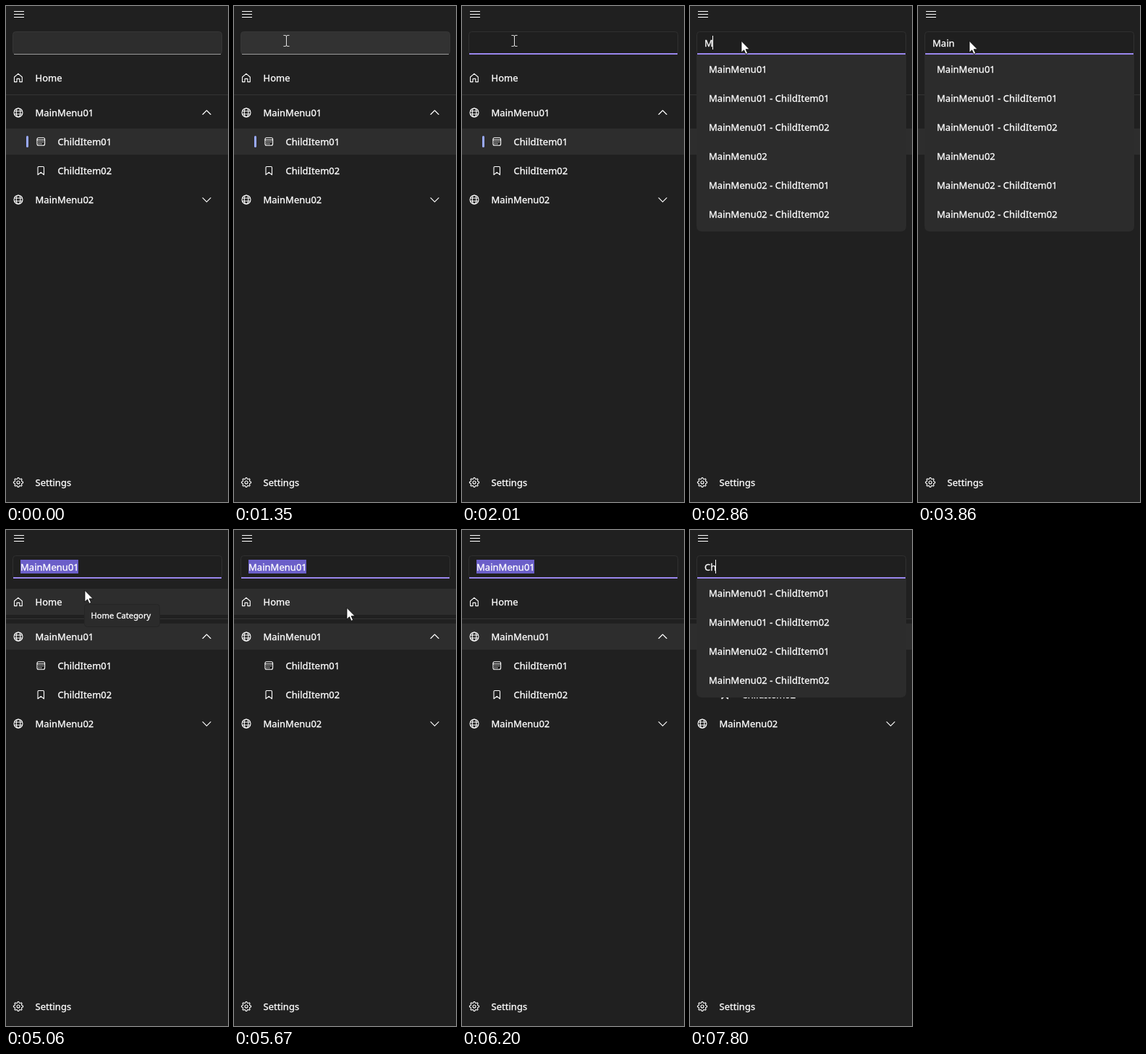
An HTML page that plays this animation: 307 px wide and 684 px high, repeating every 8000 ms.

```html
<!DOCTYPE html>
<html lang="en">
<head>
<meta charset="utf-8">
<title>Menu search</title>
<style>
  html, body { margin: 0; width: 100%; height: 100%; overflow: hidden; background: #202020; }
  svg { display: block; width: 100%; height: 100%; }
  text { font: 13px "Noto Sans", "Open Sans", sans-serif; letter-spacing: .03px; fill: #fff; stroke: #fff; stroke-width: .3; white-space: pre; }
  .icon { fill: none; stroke: #fff; stroke-width: 1.1; stroke-linecap: round; stroke-linejoin: round; }
</style>
</head>
<body>
<svg viewBox="0 0 307 684" xmlns="http://www.w3.org/2000/svg">
  <rect width="307" height="684" fill="#202020"/>
  <rect id="hover" width="307" height="36" fill="#2d2d2d"/>
  <rect id="selected" width="307" height="36" fill="#2d2d2d"/>
  <rect id="pill" x="28" y="179" width="3" height="16" rx="1.5" fill="#99a9ff"/>
  <path d="M0 122.5H307" stroke="#343434"/>

  <path d="M11 7.5H25M11 11.5H25M11 15.5H25" stroke="#fff"/>
  <g class="icon">
    <path d="M11.5 98 16.9 93.4 22.3 98V104.6H18.8V100.4H15V104.6H11.5Z"/>
    <g id="globe">
      <circle cx="17" cy="147" r="6"/>
      <ellipse cx="17" cy="147" rx="2.8" ry="6"/>
      <path d="M11.5 145H22.5M11.5 149H22.5"/>
    </g>
    <use href="#globe" y="120"/>
    <path d="M272 149.5 277.5 144 283 149.5M272 264.6 277.5 270.1 283 264.6"/>
    <rect x="43" y="181.7" width="10.6" height="10.6" rx="2"/>
    <path d="M43 184.8H53.6"/>
    <path d="M45.6 187.4h.1M48.3 187.4h.1M51 187.4h.1M45.6 190h.1M48.3 190h.1" stroke-width="1.4"/>
    <path d="M44 222.8Q44 221.5 45.3 221.5H51.2Q52.5 221.5 52.5 222.8V232.7L48.25 229.4 44 232.7Z"/>
    <path id="gear"/>
    <circle cx="17" cy="657" r="2"/>
  </g>
  <g id="labels"></g>

  <rect id="box" x="9.5" y="35.5" width="289" height="31" rx="4"/>
  <path id="line"/>
  <rect id="mark" x="20" y="41" height="19" fill="#6b5fc9"/>
  <text id="query" x="20" y="56"></text>
  <rect id="caret" y="41" width="1" height="19" fill="#fff"/>

  <g id="popup">
    <path id="panel" fill="#2c2c2c"/>
    <rect id="itemHover" x="10" y="70" width="288" height="37" rx="3" fill="#383838"/>
    <g id="items"></g>
  </g>

  <g id="tip">
    <rect x="108.5" y="102.5" width="104" height="31" rx="4" fill="#2b2b2b" stroke="#252525"/>
    <text x="117.5" y="122" style="font-size:11.2px">Home Category</text>
  </g>

  <circle id="click" cx="108" cy="82" r="12" fill="#9b951c"/>
  <g id="pointer">
    <path id="arrow" d="M1 .3V16.2L4.6 12.8 7.1 18.4 9.7 17.2 7.2 11.8H12.3Z" fill="#fff" stroke="#000" stroke-width=".8"/>
    <path id="beam" d="M-3.5 -7.5H-1.2Q.5 -7.5 .5 -6 .5 -7.5 2.2 -7.5H4.5M.5 -6V6M-3.5 7.5H-1.2Q.5 7.5 .5 6 .5 7.5 2.2 7.5H4.5" fill="none" stroke="#e4e4e4"/>
  </g>
</svg>
<script>
const LOOP = 8000;
const el = Object.fromEntries([...document.querySelectorAll('[id]')].map(n => [n.id, n]));
const set = (node, attrs) => { for (const k in attrs) node.setAttribute(k, attrs[k]); };
const show = (node, on) => { node.style.display = on ? '' : 'none'; };
const label = (x, y, s) => `<text x="${x}" y="${y}">${s}</text>`;
const within = (t, a, b) => t >= a && t < b;

el.labels.innerHTML = [
  [40.5, 104, 'Home'], [40.5, 152, 'MainMenu01'], [71.5, 192, 'ChildItem01'],
  [71.5, 232, 'ChildItem02'], [40.5, 272, 'MainMenu02'], [40.5, 662, 'Settings']
].map(a => label(...a)).join('');

// Eight-toothed gear outline
const teeth = Array.from({ length: 32 }, (_, i) => {
  const a = (i - .5) * Math.PI / 16, r = i % 4 < 2 ? 6.6 : 5;
  return (17 + r * Math.sin(a)).toFixed(2) + ' ' + (657 - r * Math.cos(a)).toFixed(2);
});
el.gear.setAttribute('d', `M${teeth.join('L')}Z`);

const options = ['MainMenu01', 'MainMenu02'].flatMap(m =>
  [m, m + ' - ChildItem01', m + ' - ChildItem02']);

const typed = [
  [0, ''], [2860, 'M'], [3120, 'Ma'], [3220, 'Mai'], [3320, 'Main'],
  [4530, 'MainMenu01'], [7060, ''], [7530, 'C'], [7800, 'Ch']
];
const carets = [[1550, 2010], [2470, 3860], [4390, 4530], [7060, LOOP]];
const moves = [
  { from: 810, to: 1350, a: [232, 23], b: [72, 48] },
  { from: 2860, to: 2861, a: [70, 48], b: [70, 48] },
  { from: 4080, to: 4400, a: [70, 48], b: [108, 83] },
  { from: 5420, to: 6130, a: [108, 83], b: [271, 168] }
];

function pointerAt(t) {
  if (t < 810 || t >= 6170) return null;
  const m = moves.filter(m => t >= m.from).pop();
  const p = Math.min(1, (t - m.from) / (m.to - m.from));
  const e = p * p * (3 - 2 * p);
  return m.a.map((v, i) => v + (m.b[i] - v) * e);
}

let shown = null;
function openPopup(filter) {
  show(el.popup, filter !== null);
  if (filter === shown || filter === null) return;
  shown = filter;
  const list = options.filter(s => s.includes(filter));
  const end = 71 + 40 * list.length;
  el.panel.setAttribute('d', `M9 67H299V${end - 8}q0 8 -8 8H17q-8 0 -8 -8Z`);
  el.items.innerHTML = list.map((s, i) => label(26, 92 + 40 * i, s)).join('');
}

function draw(t) {
  const p = pointerAt(t);
  const inBox = p && p[0] > 9 && p[0] < 299 && p[1] > 35 && p[1] < 67;
  const focus = t >= 1550 && !within(t, 4530, 4600);
  const query = typed.filter(s => t >= s[0]).pop()[1];

  set(el.selected, { y: t < 4530 ? 169 : 129 });
  show(el.pill, t < 4530);

  const row = p && t >= 4600 ? [81, 129, 169].find(y => p[1] >= y && p[1] < y + 36) : 0;
  show(el.hover, row);
  if (row) set(el.hover, { y: row });

  set(el.box, {
    fill: focus ? '#1f1f1f' : inBox ? '#323232' : '#2d2d2d',
    stroke: focus ? '#303030' : '#363636'
  });
  set(el.line, {
    d: focus ? 'M10 66H298' : 'M11 66.5H297',
    stroke: focus ? '#9986ec' : '#9a9a9a',
    'stroke-width': focus ? 2 : 1
  });

  if (el.query.textContent !== query) el.query.textContent = query;
  const width = query ? el.query.getComputedTextLength() : 0;
  const marked = within(t, 5060, 7060);
  show(el.mark, marked);
  if (marked) set(el.mark, { width: Math.floor(width) });
  show(el.caret, carets.some(c => within(t, ...c)));
  set(el.caret, { x: 20 + Math.max(0, Math.floor(width - .6)) });

  openPopup(within(t, 2860, 4600) ? 'M' : t >= 7530 ? 'C' : null);
  show(el.itemHover, within(t, 2860, 4600) && p[1] > 70);

  show(el.tip, within(t, 5060, 5600));
  show(el.click, within(t, 4460, 4600));

  show(el.pointer, p);
  if (p) {
    const beam = inBox && t < 2860;
    show(el.beam, beam);
    show(el.arrow, !beam);
    set(el.pointer, { transform: `translate(${p.map(Math.round)})` });
  }
}

const start = performance.now();
function tick() {
  draw((performance.now() - start) % LOOP);
  requestAnimationFrame(tick);
}
tick();
</script>
</body>
</html>
```
